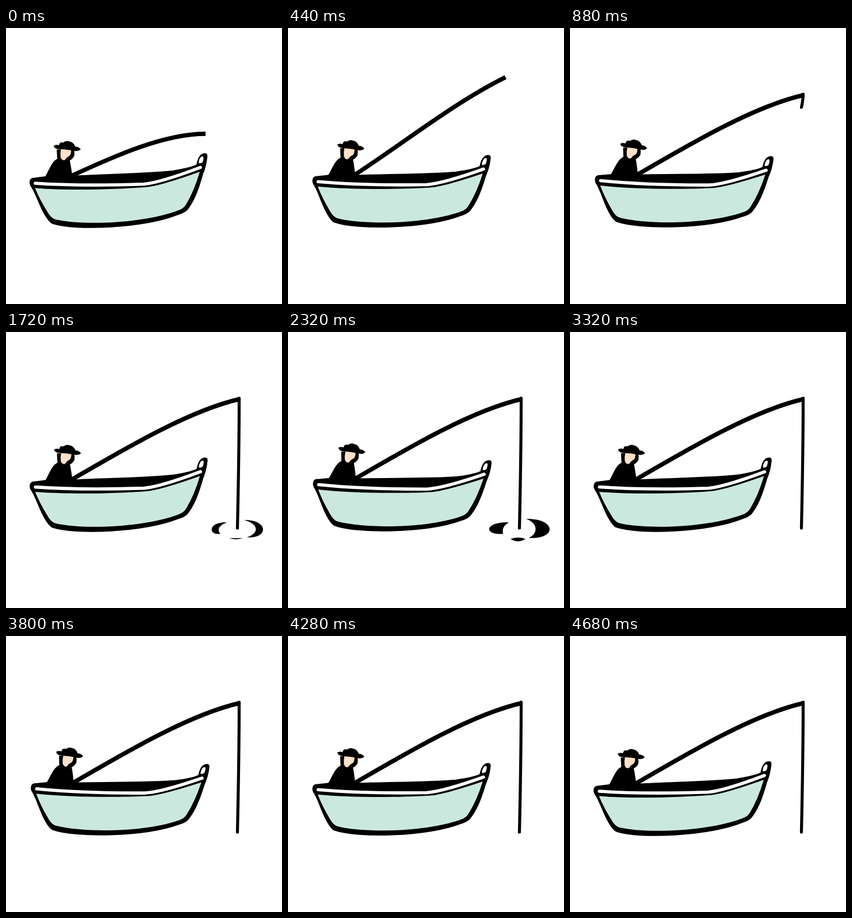
An HTML page that plays this animation: 480 by 480 pixels, repeating every 4.72 s.

```html
<!DOCTYPE html>
<html lang="en">
<head>
<meta charset="utf-8">
<title>Fishing boat</title>
<style>
html, body { margin: 0; width: 100%; height: 100%; overflow: hidden; background: #fff; }
svg { display: block; width: 100%; height: 100%; }
.ink { stroke: #000; stroke-width: 1.6; stroke-linejoin: round; }
</style>
</head>
<body>
<svg viewBox="0 0 480 480">
  <path id="rod" fill="none" stroke="#000" stroke-width="7.6"/>
  <path id="line" fill="none" stroke="#000" stroke-width="5.2" stroke-linecap="round"/>
  <path id="ripple"/>
  <g id="boat">
    <!-- angler -->
    <path class="ink" d="M67 262C75 250 79 233 90 228L89 212L117 211Q119 217 118 222Q115 228 110 230Q113 244 115 262Z"/>
    <path fill="#ffe0c8" d="M95.500 211L113 211Q114 217 111 222Q105 225 103 229Q98 232 95 225Q94 218 95.500 211Z"/>
    <path class="ink" d="M84 205Q88 203 93 205Q93 198 100 200Q104 196 110 198Q117 199 120 207Q126 207 129 211Q126 214 119 213Q104 210 94 210Q85 210 84 205Z"/>
    <!-- hull -->
    <path class="ink" d="M42 266Q43 261 50 261L70 258.500L120 257.500C190 254 250 253 290 248.500Q320 244 332 238Q335 221 343 219Q350 217 349.500 223Q348 240 342 254C333 286 326 302 315 316Q310 321 300 324C240 348 120 353 81 340Q74 337 64 318C55 300 50 283 43 274Q41 270 42 266Z"/>
    <path fill="#cbe8df" d="M50.500 278.500C110 283 190 281 246 276.500Q270 274 337 250Q327 284 313 307Q309 314 300 317C240 340 135 344 86 333Q78 331 71 318Q59 299 50.500 278.500Z"/>
    <path fill="none" stroke="#fff" stroke-width="5.600" stroke-linecap="round" d="M51 270C110 274 185 273.500 240 271.500Q268 269 338 242.500"/>
    <path fill="#fff" d="M335 235Q336 224 342 223Q345 224 342 233Q340 236 335 235Z"/>
  </g>
</svg>
<script>
const LOOP = 4720;
const $ = id => document.getElementById(id);
const mix = (a, b, p) => a + (b - a) * p;
const ease = p => (1 - Math.cos(Math.PI * p)) / 2;
const span = (t, from, to) => Math.min(1, Math.max(0, (t - from) / (to - from)));

// Rod poses: two control points and the tip.
const bent = [190, 222, 275, 184, 347, 184];
const raised = [200, 200, 290, 125, 381, 77];
const resting = [210, 201, 320, 136, 407, 116.5];
const blend = (a, b, p) => a.map((v, i) => mix(v, b[i], p));

// Piecewise linear value through [time, value] stops.
function track(t, stops) {
  let value = stops[0][1];
  for (let i = 1; i < stops.length; i++)
    value = mix(value, stops[i][1], span(t, stops[i - 1][0], stops[i][0]));
  return value;
}

// Crescent between two tips; outer and inner are the x reached halfway.
function crescent(x0, y0, x1, y1, outer, inner, pinch) {
  const control = x => (x - (x0 + x1) / 8) / 0.75;
  const o = control(outer), i = control(inner);
  return `M${x0} ${y0}C${o} ${y0 - 1} ${o} ${y1 + 3} ${x1} ${y1}` +
    `C${i} ${y1 - pinch} ${i} ${y0 + pinch} ${x0} ${y0}Z`;
}

function ripple(t) {
  if (t < 1500 || t > 3280) return '';
  const outer = track(t, [[1500, 40], [1720, 44.5], [2100, 52.5]]);
  const inner = track(t, [[1500, 39], [1720, 32], [2320, 28], [2800, 38], [3280, 52.5]]);
  const grow = (outer - 44.5) / 8;
  const thick = (outer - inner) / 24.5;
  const pinch = 7 * Math.min(1, 2 * thick);
  const w = 12 + grow, y = 358.5 + 1.5 * grow;
  return crescent(384, 331, 371 + 3 * thick, 351, 402.5 - outer, 402.5 - inner, pinch) +
    crescent(414, 327 - 2 * grow, 419, 357 + grow, 402.5 + outer, 402.5 + inner, pinch) +
    `M${400 - w} ${y}Q400 ${y + 4 + 4 * grow} ${400 + w} ${y}Q400 ${y + 5 - 10 * thick} ${400 - w} ${y}Z`;
}

function draw(now) {
  const t = now % LOOP;
  const sway = ease(2 * 3 * t / LOOP);
  $('boat').setAttribute('transform', `rotate(${1.9 * sway} 190 340)`);

  const pose = t < 540
    ? blend(bent, raised, ease(span(t, 0, 540)))
    : blend(raised, resting, ease(span(t, 540, 780)));
  $('rod').setAttribute('d', `M112 258C${pose}`);

  const drop = ease(span(t, 720, 1500));
  const end = mix(115, 341, drop);
  $('line').setAttribute('d', drop > 0 ? `M405.500 115Q405.500 ${mix(115, end, 0.4)} 402.500 ${end}` : '');
  $('ripple').setAttribute('d', ripple(t));
  requestAnimationFrame(() => draw(performance.now() - start));
}

const start = performance.now();
draw(0);
</script>
</body>
</html>
```
